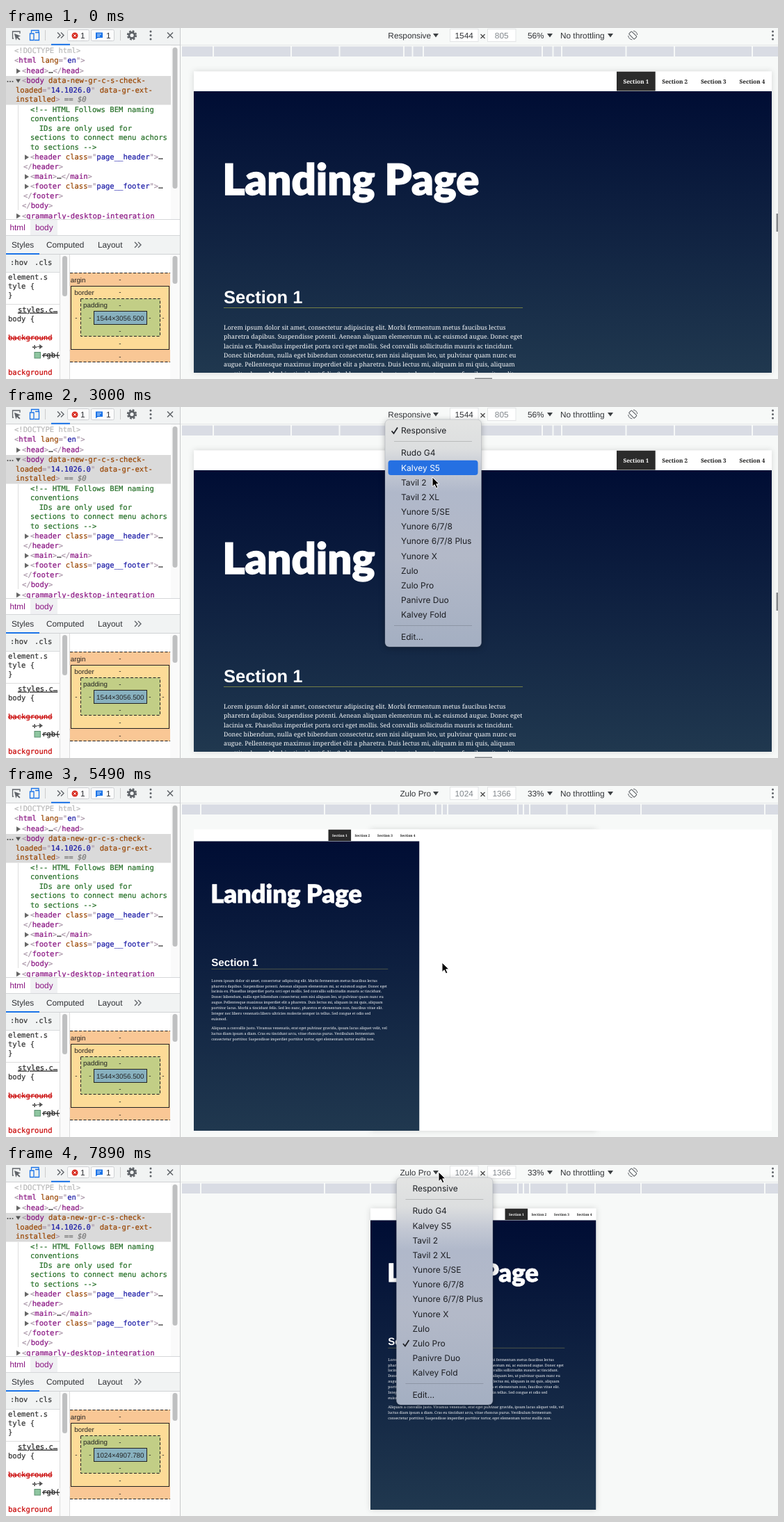
Write an HTML page that moves like this. It is 1110x505 px and loops after 8 s.

```html
<!DOCTYPE html>
<html lang="en">
<head>
<meta charset="utf-8">
<title>Device toolbar</title>
<style>
  html, body { margin: 0; width: 100%; height: 100%; overflow: hidden; background: #f7f9f8; }
  #stage { display: block; width: 100vw; height: 100vh; text-rendering: geometricPrecision; }
  text { white-space: pre; font: 11.8px "Liberation Sans", Arial, sans-serif; color: #303236; fill: currentColor; }
  .code { font: 10.55px "DejaVu Sans Mono", monospace; color: #222; }
  .code, .code tspan { fill: currentColor; stroke: currentColor; stroke-width: .2; }
  .box { font-size: 9.8px; text-anchor: middle; color: #222; }
  .menu { font: 12px Inter, sans-serif; color: #1d1f24; }
  .title { font-family: Lato, sans-serif; font-weight: 900; color: #fff; stroke: #fff; }
  .heading { font-weight: 700; color: #fff; }
  .serif { font-family: "Noto Serif", serif; color: #fafbfc; }
  .nav { font-family: "Noto Serif", serif; font-weight: 700; text-anchor: middle; color: #1b1b1b; }
  .mid { text-anchor: middle; }
  .p { color: #a894a6; } .t { color: #881280; } .a { color: #994500; }
  .v { color: #1a1aa6; } .c { color: #236e25; } .d { color: #b8b8b8; }
  .k { color: #333; } .i { color: #777; font-style: italic; } .r { color: #c80000; }
  .strike { text-decoration: line-through; }
</style>
</head>
<body>
<svg id="stage" viewBox="0 0 1110 505" preserveAspectRatio="none"></svg>
<script>
const stage = document.getElementById('stage');
const esc = s => s.replace(/&/g, '&amp;').replace(/</g, '&lt;');
const rect = (x, y, w, h, fill, more = '') =>
  `<rect x="${x}" y="${y}" width="${w}" height="${h}" fill="${fill}" ${more}/>`;
const text = (x, y, s, cls = '', more = '') =>
  `<text x="${x}" y="${y}" class="${cls}" ${more}>${esc(s)}</text>`;
const path = (d, stroke, more = '') => `<path d="${d}" fill="none" stroke="${stroke}" ${more}/>`;
const shape = (d, fill, more = '') => `<path d="${d}" fill="${fill}" ${more}/>`;
const size = px => `style="font-size:${px}px"`;
const down = x => shape(`M${x - 4} 8h8l-4 5.5z`, '#3c4043');
const dots = x => [5, 10.5, 16].map(y => `<circle cx="${x}" cy="${y}" r="1.5" fill="#5f6368"/>`).join('');
const more = (x, y) => path(`M${x - 4} ${y - 4}l4 4-4 4m5-8l4 4-4 4`, '#5f6368', 'stroke-width="1.4"');
const thumb = (x, y, h) => rect(x, y, 7, h, '#bfc0c1', 'rx="3.5"');

// Each token starts with the letter of its colour class.
const codeLine = (x, y, tokens) => `<text class="code" x="${x}" y="${y + 3.4}">` +
  tokens.split('|').map(s => `<tspan class="${s[0]}">${esc(s.slice(1))}</tspan>`).join('') + '</text>';

function elementsPanel() {
  const lines = [
    [12, 33, 'd<!DOCTYPE html>'],
    [12, 47, 'p<|thtml|a lang|p="|ven|p">'],
    [23, 62, 'p<|thead|p>|k…|p</|thead|p>'],
    [23, 76, 'p<|tbody|a data-new-gr-c-s-check-'],
    [14, 89.5, 'aloaded|p="|v14.1026.0|p"|a data-gr-ext-'],
    [14, 103, 'ainstalled|p>|i == $0'],
    [35, 118, 'c<!-- HTML Follows BEM naming'],
    [35, 131, 'cconventions'],
    [35, 145, 'c  IDs are only used for'],
    [35, 158, 'csections to connect menu achors'],
    [35, 172, 'cto sections -->'],
    [35, 186, 'p<|theader|a class|p="|vpage__header|p">|k…'],
    [25, 199.5, 'p</|theader|p>'],
    [35, 214, 'p<|tmain|p>|k…|p</|tmain|p>'],
    [35, 228, 'p<|tfooter|a class|p="|vpage__footer|p">|k…'],
    [25, 241.5, 'p</|tfooter|p>'],
    [23, 256, 'p</|tbody|p>'],
    [23, 270.5, 'p<|tgrammarly-desktop-integration'],
  ];
  const arrows = [[15, 62], [27, 186], [27, 214], [27, 228], [15, 270.5]];
  return rect(0, 25, 237, 250, '#fff') + rect(237, 25, 13, 250, '#fafafa') + thumb(239.5, 28, 203) +
    rect(0, 69, 237, 41.5, '#dadada') + path('M17.5 111V262', '#ddd') +
    [2.5, 6, 9.5].map(x => `<circle cx="${x}" cy="77" r="1.1" fill="#555"/>`).join('') +
    shape('M14 73.5h7l-3.5 5.5z', '#555') +
    arrows.map(([x, y]) => shape(`M${x} ${y - 3.7}l6 3.7-6 3.7z`, '#666')).join('') +
    lines.map(l => codeLine(...l)).join('');
}

function leftToolbar() {
  const badge = (x, w) => rect(x, 2.5, w, 16, '#fbfbfb', 'stroke="#cfd1d4" rx="2"');
  return rect(0, 0, 250, 24.5, '#f1f3f3') + path('M0 24.5H250', '#cfd1d3') +
    path('M11 15H9.5V5H20V8', '#5f6368', 'stroke-width="1.3"') +
    shape('M12 8l9 3.5-3.8 1.4 3.3 3.3-1.4 1.3-3.3-3.3-1.5 3.6z', '#5f6368') +
    path('M36.5 7V3.5H47V6M34.5 8h5.5v9.5h-5.5zM41 17.5h6.5V6.5H42', '#1a73e8', 'stroke-width="1.3"') +
    path('M56.5 3V18', '#ccc') + more(78, 10.5) + rect(65, 22.8, 27, 2, '#1a73e8') +
    badge(88.5, 31) + '<circle cx="99" cy="11" r="4.5" fill="#d93025"/>' +
    path('M97.3 9.3l3.4 3.4m0-3.4l-3.4 3.4', '#fff') + text(107, 15, '1') +
    badge(122.5, 33) + shape('M129 6.5h10v7.5h-7l-3 2.5z', '#1a73e8') +
    path('M131 9h6m-6 2.5h4', '#fff', 'stroke-width=".9"') + text(144, 15, '1') +
    path('M164.5 3V18', '#ccc') +
    '<circle cx="181" cy="10.5" r="4" fill="none" stroke="#5f6368" stroke-width="2.8"/>' +
    '<circle cx="181" cy="10.5" r="6" fill="none" stroke="#5f6368" stroke-width="2.4" stroke-dasharray="2.7 2.01"/>' +
    dots(208) + path('M232 6.5l8 8m0-8l-8 8', '#5f6368', 'stroke-width="1.5"');
}

function stylesPanel() {
  const dashes = [[164, 362], [164, 380], [164, 399], [164, 436], [164, 454], [164, 473],
    [101, 417], [121, 417], [207, 417], [226, 417]];
  const dash = 'stroke="#222" stroke-dasharray="4 2.5"';
  return rect(0, 275, 250, 230, '#fff') + rect(35, 276, 39, 22.5, '#f0f1f3') +
    path('M0 275.5H250M0 298.5H250', '#d5d7d9') +
    text(5.5, 291, 'html', 't') + text(42, 291, 'body', 't') +
    rect(0, 299, 250, 26, '#f1f3f3') + path('M0 325.5H250', '#d0d2d4') +
    text(8, 316, 'Styles') + text(58, 316, 'Computed') + text(132, 316, 'Layout') + more(189, 312) +
    rect(0, 324, 48, 2, '#1a73e8') +
    rect(0, 326, 77, 25, '#f1f3f3') + path('M0 351.5H77', '#d8dadc') +
    codeLine(6, 338, 'k:hov') + codeLine(41, 338, 'k.cls') +
    rect(77, 326, 14, 179, '#fafafa') + path('M77.5 326V505M91.5 326V505', '#dcdcdc') + thumb(81, 328, 58) +
    codeLine(3, 359, 'kelement.s') + codeLine(3, 372, 'ktyle {') + codeLine(3, 385, 'k}') +
    path('M0 397.5H77', '#ddd') +
    text(17, 408.7, 'styles.c…', 'code', 'text-decoration="underline"') + codeLine(3, 419, 'kbody {') +
    text(3, 449.2, 'background', 'code r strike') + text(38, 462.2, ':', 'code strike') +
    shape('M45 458h3v-3l5 3.5-5 3.5v-3h-3z', '#555') +
    rect(41, 466.5, 8.5, 8.5, '#8fc6a0', 'stroke="#5d8f70"') + text(52, 474.2, 'rgb(', 'code strike') +
    rect(77.5, 465, 14, 12, '#fafafa') + text(3, 499.2, 'background', 'code r') +
    rect(92, 352, 144, 129, '#f9c795') + path('M92 352.5H236M92 480.5H236', '#222', 'stroke-dasharray="4 2.5"') +
    '<svg x="92" y="352" width="144" height="30">' + text(7.5, 13.7, 'margin', 'box') + '</svg>' +
    rect(93.5, 371.5, 141, 91, '#fddb97', 'stroke="#222"') + text(112.5, 383.7, 'border', 'box') +
    rect(107.5, 389.5, 114, 54, '#c2ce86', dash) + text(128.5, 402.2, 'padding', 'box') +
    rect(126.5, 407.5, 76, 19, '#88b1bf', 'stroke="#222"') +
    text(164.3, 420.6, '', 'box', 'id="dims"') +
    dashes.map(([x, y]) => text(x, y + 3, '-', 'box')).join('') +
    rect(236, 326, 14, 179, '#fafafa') + thumb(239.5, 328, 40);
}

const ruler = (id, gaps) => `<g id="${id}">` + rect(253, 26.5, 857, 14.5, '#d9dce4') +
  gaps.map(d => rect(684.5 - d, 26, 2, 16, '#f7f9f8') + rect(684.5 + d, 26, 2, 16, '#f7f9f8')).join('') + '</g>';

function rightToolbar() {
  const field = (x, id) => rect(x, 1.5, 40.5, 18, '#fff', 'stroke="#e3e5e6"') +
    text(x + 20.2, 14.5, '', 'mid', `id="${id}"`);
  return text(611, 14.5, '', '', 'id="device" text-anchor="end"') + down(618) +
    field(638.5, 'width') + path('M682.5 9l6 6m0-6l-6 6', '#444', 'stroke-width="1.2"') + field(692.5, 'height') +
    text(750, 14.5, '', '', 'id="zoom"') + down(782) + text(797, 14.5, 'No throttling') + down(869) +
    rect(898.5, 5, 5.5, 11, 'none', 'rx="1" stroke="#5f6368" stroke-width="1.1" transform="rotate(-45 901.2 10.5)"') +
    path('M902 4.2a6.5 6.5 0 0 1 5.7 5.8M900.4 16.8a6.5 6.5 0 0 1-5.7-5.8', '#5f6368') +
    dots(1102.5) + path('M251 24.5H1110', '#e6e8e8') +
    ruler('wideRuler', [387.5, 275.5, 206, 113.5, 101, 85.5]) +
    ruler('tabletRuler', [405.5, 227.5, 161.5, 121, 67.5, 58.5, 50.5]);
}

const prose = `Lorem ipsum dolor sit amet, consectetur adipiscing elit. Morbi fermentum metus faucibus lectus
pharetra dapibus. Suspendisse potenti. Aenean aliquam elementum mi, ac euismod augue. Donec eget
lacinia ex. Phasellus imperdiet porta orci eget mollis. Sed convallis sollicitudin mauris ac tincidunt.
Donec bibendum, nulla eget bibendum consectetur, sem nisi aliquam leo, ut pulvinar quam nunc eu
augue. Pellentesque maximus imperdiet elit a pharetra. Duis lectus mi, aliquam in mi quis, aliquam
porttitor lacus. Morbi a tincidunt felis. Sed leo nunc, pharetra et elementum non, faucibus vitae elit.
Integer nec libero venenatis libero ultricies molestie semper in tellus. Sed congue et odio sed
euismod.
Aliquam a convallis justo. Vivamus venenatis, erat eget pulvinar gravida, ipsum lacus aliquet velit, vel
luctus diam ipsum a diam. Cras eu tincidunt arcu, vitae rhoncus purus. Vestibulum fermentum
consectetur porttitor. Suspendisse imperdiet porttitor tortor, eget elementum tortor mollis non.`.split('\n');

// Vertical positions are measured from the top of the page.
const page = (id, p) => `<svg id="${id}" x="270" y="62.5" width="${p.w}" height="433.5">` +
  rect(0, 0, p.w, 434, '#fff') + rect(0, p.head, p.w, 434 - p.head, 'url(#night)') +
  rect(p.nav, 0, p.step, p.head - .5, '#2b2b2b') +
  [0, 1, 2, 3].map(i => text(p.nav + p.step * (i + .5), p.navY, `Section ${i + 1}`, 'nav',
    `style="font-size:${p.navSize}px${i ? '' : ';fill:#fff'}"`)).join('') +
  text(p.pad - p.title * .03, p.titleY, 'Landing Page', 'title',
    `style="font-size:${p.title}px;stroke-width:${p.title / 48}"`) +
  text(p.pad, p.h2Y, 'Section 1', 'heading', size(p.h2)) +
  rect(p.pad, p.ruleY, p.ruleW, 1, p.rule) +
  prose.map((s, i) => text(p.pad, p.bodyY + p.pitch * (i + (i > 7 ? .65 : 0)), s, 'serif', size(p.body))).join('') +
  '</svg>';

const widePage = { w: 831, head: 28.5, nav: 608, step: 55.7, navY: 17.3, navSize: 8.1, pad: 43, title: 61.6, titleY: 177.7,
  h2: 25.5, h2Y: 333, ruleY: 339.5, ruleW: 430, rule: '#747e45', body: 8.85, bodyY: 371.3, pitch: 13.35 };
const tabletPage = { w: 324.5, head: 17, nav: 193.5, step: 32.6, navY: 10.2, navSize: 4.8, pad: 25.3, title: 36.3, titleY: 105,
  h2: 15.1, h2Y: 196.8, ruleY: 200.3, ruleW: 254, rule: '#4b5449', body: 5.21, bodyY: 219.2, pitch: 7.88 };

const devices = ['Rudo G4', 'Kalvey S5', 'Tavil 2', 'Tavil 2 XL', 'Yunore 5/SE', 'Yunore 6/7/8', 'Yunore 6/7/8 Plus',
  'Yunore X', 'Zulo', 'Zulo Pro', 'Panivre Duo', 'Kalvey Fold'];
const items = [['Responsive', 34], ...devices.map((name, i) => [name, 66 + 21.17 * i]), ['Edit…', 330.5]];

const menu = () => '<g id="menu">' +
  rect(545, 18, 138.5, 327, 'url(#frost)', 'id="panel" rx="6" stroke="#8a8f99" stroke-opacity=".5" stroke-width=".6" style="filter:drop-shadow(0 2px 4px rgba(0,0,0,.28))"') +
  path('M558 49.5H670M558 314.5H670', '#000', 'stroke-opacity=".16"') +
  rect(549.5, 0, 129, 21.2, '#2570e2', 'id="mark" rx="4"') +
  items.map(([name, y]) => text(568, y + 4.4, name, 'menu item')).join('') +
  path('M554.5 .5l3 3.5 5.5-8.5', '#1d1f24', 'id="check" stroke-width="1.7"') + '</g>';

stage.innerHTML = `<defs>
  <linearGradient id="night" x2="0" y2="1"><stop stop-color="#000d34"/><stop offset="1" stop-color="#20384f"/></linearGradient>
  <linearGradient id="frost" x2="0" y2="1"><stop stop-color="#e3e4e3"/><stop offset=".13" stop-color="#dcdedf"/>
    <stop offset=".23" stop-color="#c2c7d3"/><stop offset=".32" stop-color="#b0b8ca"/>
    <stop offset=".6" stop-color="#b3b9c8"/><stop offset="1" stop-color="#a4afc2"/></linearGradient>
  <clipPath id="left">${rect(0, 0, 250, 275, '#000')}</clipPath></defs>` +
  rect(0, 0, 1110, 505, '#f7f9f8') +
  `<g clip-path="url(#left)">${elementsPanel()}</g>` + leftToolbar() + stylesPanel() +
  path('M250.5 0V505', '#c8cacc') + rightToolbar() +
  rect(270, 62.5, 831, 433.5, '#fff', 'id="shade" style="filter:drop-shadow(0 0 4px rgba(0,0,0,.14))"') +
  rect(270, 62.5, 831, 433.5, '#fff', 'id="blank"') +
  page('wide', widePage) + page('tablet', tabletPage) +
  '<g id="grips">' + rect(1107.5, 267, 3, 26, '#85888b') + rect(674, 503.5, 25, 2, '#85888b') + '</g>' + menu() +
  '<g id="touch"><circle r="9.3" fill="#50545c" fill-opacity=".6" stroke="#a0a3a8" stroke-opacity=".65" stroke-width="2"/>' +
  '<circle r="5" fill="#20242c" fill-opacity=".5"/></g>' +
  shape('M0 0V13.6L3.2 10.7 5.5 15.8 7.9 14.8 5.7 9.8H10z', '#000', 'id="arrow" stroke="#fff" stroke-width="1"');

const el = {};
stage.querySelectorAll('[id]').forEach(node => el[node.id] = node);
const labels = [...stage.querySelectorAll('.item')];
const show = (node, on) => node.style.display = on ? '' : 'none';
const move = (node, x, y) => node.setAttribute('transform', `translate(${x} ${y})`);

// Pointer path: time, x, y
const route = [[1500, 627, -5], [1800, 616, 13], [2500, 616, 13], [2800, 611, 55], [2900, 611, 85], [3000, 613, 101],
  [3200, 620, 210], [3300, 624, 284], [3400, 626, 240], [3600, 626, 186], [3800, 627, 250], [3900, 627, 254],
  [5590, 627, 254], [6090, 720, 213], [6290, 632, 143], [6590, 624, 62], [6990, 618, 17], [7290, 622, 10], [8000, 622, 10]];

function pointer(t) {
  const n = Math.max(1, route.findIndex(p => p[0] >= t));
  const [t0, x0, y0] = route[n - 1], [t1, x1, y1] = route[n];
  const k = Math.max(0, (t - t0) / (t1 - t0));
  return [x0 + (x1 - x0) * k, y0 + (y1 - y0) * k];
}

function draw(now) {
  const start = now < 5290 ? 0 : 5290;
  const t = start + Math.floor((now - start) / 100) * 100;
  const tablet = t >= 5390, loaded = t >= 5490, centred = t >= 5690, fading = t === 5290;

  el.device.textContent = tablet ? 'Zulo Pro' : 'Responsive';
  el.width.textContent = tablet ? '1024' : '1544';
  el.height.textContent = tablet ? '1366' : '805';
  el.width.style.fill = tablet ? '#80868b' : '#303236';
  el.height.style.fill = '#80868b';
  el.zoom.textContent = tablet ? '33%' : '56%';
  el.dims.textContent = t >= 5890 ? '1024×4907.780' : '1544×3056.500';
  show(el.wideRuler, !tablet);
  show(el.tabletRuler, tablet);
  show(el.grips, !loaded);
  show(el.wide, !loaded);
  show(el.tablet, loaded);
  show(el.blank, loaded && !centred);
  el.tablet.setAttribute('x', centred ? 524 : 270);
  el.shade.setAttribute('x', loaded ? 524 : 270);
  el.shade.setAttribute('width', loaded ? 324.5 : 831);

  const [x, y] = pointer(t);
  const touching = t >= 5890 && y > 62;
  show(el.touch, touching);
  show(el.arrow, t >= 1500 && !touching);
  move(el.touch, x, y);
  move(el.arrow, x, y);

  const open = t >= 2300 && t < 5390 || t >= 7790;
  show(el.menu, open);
  if (!open) return;
  const lagging = pointer(t - 100)[1];
  const picked = items.findIndex(([, c]) => Math.abs(lagging - c) < 10.6);
  const checked = tablet ? 10 : 0;
  move(el.menu, tablet ? 16.4 : 0, 0);
  el.panel.style.fillOpacity = fading ? .75 : 1;
  show(el.mark, picked >= 0);
  if (picked >= 0) el.mark.setAttribute('y', items[picked][1] - 10.4);
  labels.forEach((label, i) => label.style.fill = i === picked ? (fading ? '#d5d8f2' : '#fff') : '');
  move(el.check, 0, items[checked][1]);
  el.check.style.stroke = picked === checked ? '#fff' : '';
}

const origin = performance.now();
function tick() {
  draw((performance.now() - origin) % 8000);
  requestAnimationFrame(tick);
}
tick();
</script>
</body>
</html>
```
